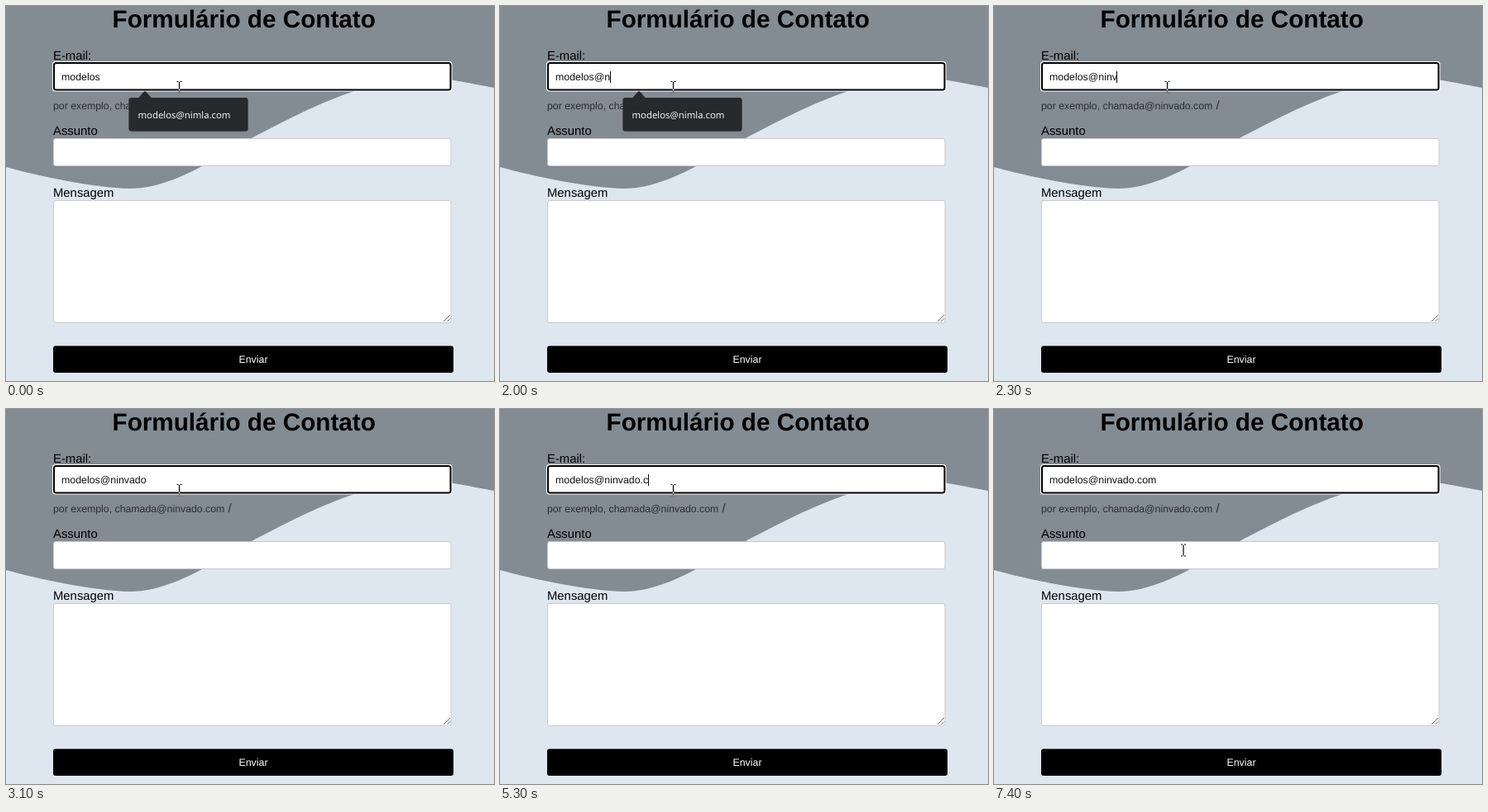
These frames come from a looping animation (590 px wide and 454 px high, 8000 ms). An HTML page:

```html
<!DOCTYPE html>
<html lang="pt">
<head>
<meta charset="utf-8">
<title>Formulário de Contato</title>
<style>
  html, body { margin: 0; width: 100%; height: 100%; overflow: hidden; background: #dee7f0; }
  svg { display: block; }
  text { font: 14.85px "Liberation Sans", Arial, sans-serif; text-rendering: geometricPrecision; white-space: pre; }
  .small { font-size: 12.37px; }
  .field { fill: #fff; stroke: #c6c9cc; }
</style>
</head>
<body>
<svg width="590" height="454" viewBox="0 0 590 454">
  <rect width="590" height="454" fill="#dee7f0"/>
  <path fill="#838b93" d="M0 0V195C40 206 105 220 150 221C200 221 250 186 297 160C340 138 420 92 500 86C535 87 560 94 590 99V0Z"/>

  <text x="128.5" y="26" style="font-size:29.7px;font-weight:bold">Formulário de Contato</text>
  <text x="57" y="65">E-mail:</text>
  <text x="57" y="156">Assunto</text>
  <text x="57" y="231">Mensagem</text>
  <text x="57" y="125" fill="#2b2e32" style="font-size:12.3px">por exemplo, chamada@ninvado.com</text>
  <text x="268.5" y="125" fill="#2b2e32">/</text>

  <rect x="56" y="67" width="483.5" height="36.5" rx="3.5" fill="#fff"/>
  <rect x="58" y="69" width="479.5" height="32.5" rx="2.5" fill="#fff" stroke="#000" stroke-width="2"/>
  <rect class="field" x="57.5" y="160.5" width="480.5" height="33" rx="2.5"/>
  <rect class="field" x="57.5" y="235.5" width="480.5" height="148" rx="2.5"/>
  <path d="M529 382L537 374M533.5 382L537 378.500" stroke="#555" stroke-width=".9"/>
  <rect x="57" y="411.500" width="484" height="32.500" rx="3"/>
  <text class="small" x="299" y="432" fill="#fff" text-anchor="middle">Enviar</text>

  <text class="small" id="typed" x="67" y="90" fill="#111"></text>
  <rect id="caret" y="79" width="1" height="14"/>

  <g id="popup">
    <rect x="148" y="111.500" width="145" height="41" rx="4" opacity=".18"/>
    <path d="M160 111.500L166.500 104Q168 102.500 169.500 104L176 111.500Z" fill="#28292d"/>
    <rect x="148.500" y="111" width="144" height="40.500" rx="3" fill="#28292d"/>
    <text x="159.500" y="136" fill="#fff" style="font:11.4px 'Open Sans','Noto Sans',sans-serif">modelos@nimla.com</text>
  </g>

  <path id="pointer" d="M-3-7H-1M1-7H3M0-6.500V6.500M-3 7H-1M1 7H3" stroke="#fff" stroke-width="1.200" style="mix-blend-mode:difference"/>
</svg>
<script>
  const [typed, caret, popup, pointer] =
    ["typed", "caret", "popup", "pointer"].map(id => document.getElementById(id));
  const address = "modelos@ninvado.com", typo = "modelos@ninvado.cpm";

  // [start, text, caret visible]
  const edits = [
    [0, address.slice(0, 7), false],
    [900, address.slice(0, 8), true],
    ...[9, 10, 11, 12, 13, 14].map((n, i) => [2000 + i * 100, address.slice(0, n), true]),
    [2800, address.slice(0, 15), true],
    [3100, address.slice(0, 15), false],
    [4000, address.slice(0, 16), true],
    [4100, address.slice(0, 17), true],
    [4300, typo.slice(0, 18), true],
    [4400, typo, true],
    [4900, typo.slice(0, 18), true],
    [5200, address.slice(0, 17), true],
    [5400, address.slice(0, 18), true],
    [6000, address, true],
    [6200, address, false],
    [7000, address, true],
    [7400, address, false]
  ];

  const progress = (t, from, to) => Math.min(1, Math.max(0, (t - from) / (to - from)));

  function draw(now) {
    const t = Math.floor(now % 8000 / 100) * 100;

    const [, text, blink] = edits.findLast(e => e[0] <= t);
    typed.textContent = text;
    caret.setAttribute("x", Math.floor(67 + typed.getComputedTextLength()));
    caret.style.opacity = blink ? 1 : 0;

    const fade = progress(t, 2000, 2200), scale = 1 - fade * 0.05;
    popup.setAttribute("opacity", 1 - fade);
    popup.setAttribute("transform",
      `translate(220.500 131) scale(${scale}) translate(-220.500 -131)`);

    const p = progress(t, 6900, 7400), ease = p * p * (3 - 2 * p);
    pointer.setAttribute("transform", `translate(${209.5 + 19.5 * ease} ${98.5 + 72.5 * ease})`);

    requestAnimationFrame(draw);
  }
  requestAnimationFrame(draw);
</script>
</body>
</html>
```
